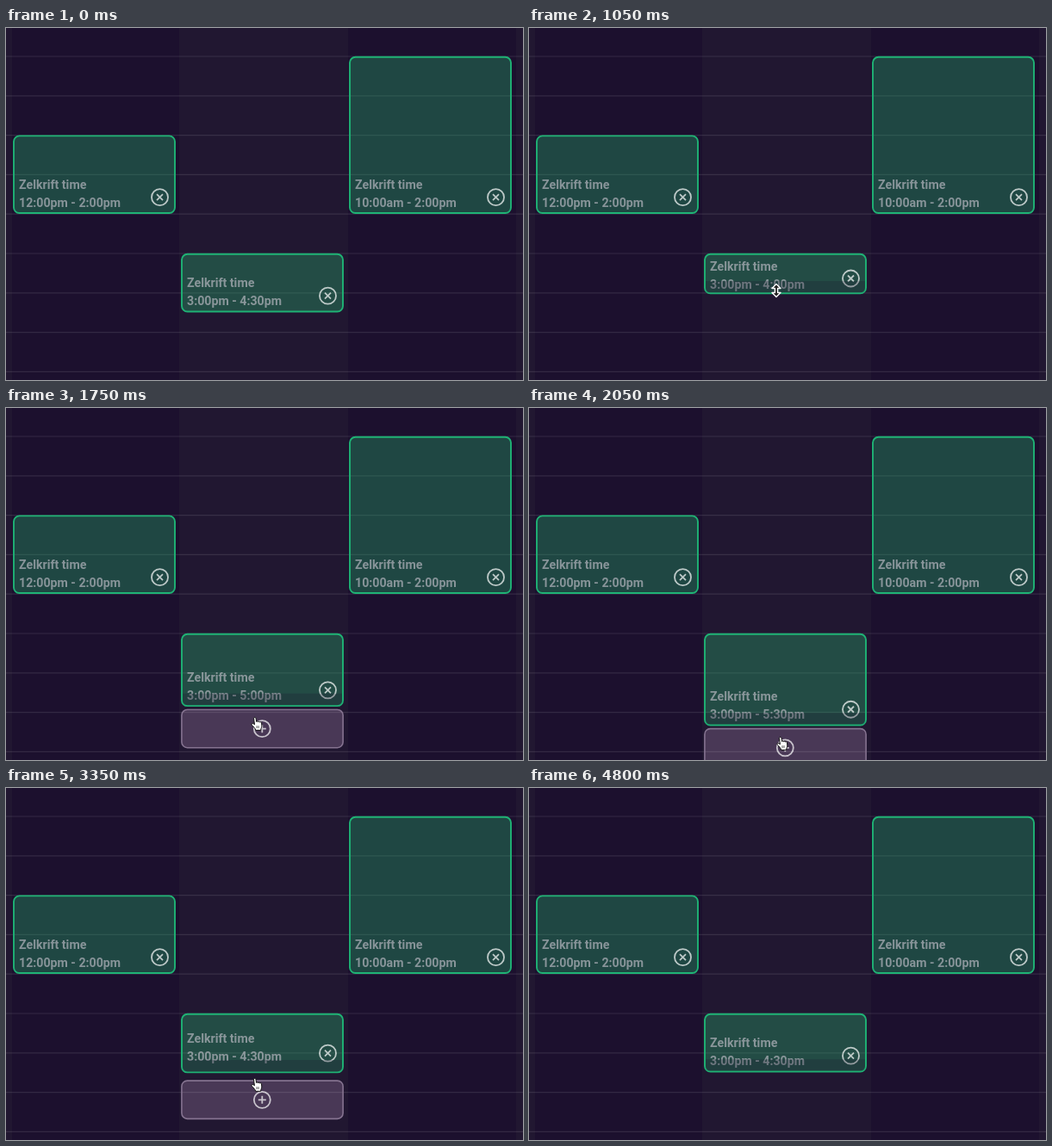
An HTML page for the animation above (4850 ms loop, 600 by 409 pixels).

```html
<!DOCTYPE html>
<html lang="en">
<head>
<meta charset="utf-8">
<title>Calendar slots</title>
<style>
  html, body { margin: 0; width: 100%; height: 100%; overflow: hidden; background: #1c102e; }
  svg { display: block; width: 600px; height: 409px; }
  text { font: 600 14.2px Roboto, sans-serif; fill: rgba(232, 218, 232, .52); }
  .column { fill: #211731; }
  .line { stroke: rgba(255, 255, 255, .1); stroke-width: 1.2; }
  .card { fill: rgba(39, 176, 106, .35); stroke: #1fb375; stroke-width: 1.9; }
  .slot { fill: rgba(255, 206, 255, .18); stroke: #857390; stroke-width: 1.6; }
  .icon { fill: none; stroke: rgba(255, 255, 255, .7); stroke-width: 1.8; }
  .hand { fill: #fff; stroke: #111; stroke-linejoin: round; }
  .arrows { fill: #222; stroke: #fff; stroke-width: 1.4; stroke-linejoin: round; }
</style>
</head>
<body>
<svg id="stage" viewBox="0 0 600 409"></svg>
<script>
const LOOP = 4850, TICK = 50;
const HOUR = 45.8, FIRST = 10, GRID_TOP = 33;
const stage = document.getElementById('stage');

function add(parent, tag, attrs = {}, text = '') {
  const el = document.createElementNS('http://www.w3.org/2000/svg', tag);
  set(el, attrs);
  el.textContent = text;
  parent.append(el);
  return el;
}

function set(el, attrs) {
  for (const key in attrs) el.setAttribute(key, attrs[key]);
}

const move = (el, x, y) => el.setAttribute('transform', `translate(${x} ${y})`);
const show = (el, on) => el.setAttribute('visibility', on ? 'visible' : 'hidden');
const hourY = h => GRID_TOP + (h - FIRST) * HOUR;

function clock(h) {
  return `${Math.floor(h - 1) % 12 + 1}:${h % 1 ? '30' : '00'}${h < 12 ? 'am' : 'pm'}`;
}

// The CSS "ease" curve, cubic-bezier(.25, .1, .25, 1)
function ease(x) {
  if (x <= 0) return 0;
  if (x >= 1) return 1;
  const bez = (u, a, b) => 3 * u * (1 - u) * (1 - u) * a + 3 * u * u * (1 - u) * b + u * u * u;
  let lo = 0, hi = 1;
  for (let i = 0; i < 20; i++) {
    const mid = (lo + hi) / 2;
    if (bez(mid, .25, .25) < x) lo = mid; else hi = mid;
  }
  return bez(lo, .1, 1);
}

// What the pointer is over, and the hour at which the middle card ends
const events = [
  { at: 0, over: '', end: 16.5 },
  { at: 200, over: 'card', end: 16.5 },
  { at: 850, over: 'card', end: 16 },
  { at: 1350, over: 'slot', end: 16.5 },
  { at: 1620, over: 'slot', end: 17 },
  { at: 1925, over: 'slot', end: 17.5 },
  { at: 2668, over: 'card', end: 17.5 },
  { at: 2780, over: 'card', end: 17 },
  { at: 3125, over: 'card', end: 16.5 },
  { at: 3245, over: 'slot', end: 16.5 },
  { at: 3820, over: 'card', end: 16.5 },
  { at: 4480, over: '', end: 16.5 }
];

// Time and position of the pointer
const path = [
  [100, 300, 430], [300, 287, 313], [600, 287, 313], [900, 287, 318], [1050, 287, 305],
  [1350, 287, 335], [1500, 287, 335], [1950, 294, 390], [2450, 294, 390], [2800, 293, 361],
  [3150, 293, 338], [3350, 291, 345], [3650, 291, 345], [3950, 289, 300], [4450, 289, 300],
  [4640, 300, 430]
];

// Transitions toward goal(event) each time it changes
function follow(goal, t, duration = 300) {
  let last = goal(events[0]), value = last;
  for (const e of events) {
    const next = goal(e);
    if (next !== last) value += (next - value) * ease((t - e.at) / duration);
    last = next;
  }
  return value;
}

function pointerAt(t) {
  const i = path.findIndex(p => p[0] > t);
  if (i < 1) return [300, 440];
  const [t0, x0, y0] = path[i - 1], [t1, x1, y1] = path[i];
  const u = (t - t0) / (t1 - t0), k = u * u * (3 - 2 * u);
  return [x0 + (x1 - x0) * k, y0 + (y1 - y0) * k];
}

function addIcon(parent, mark) {
  const g = add(parent, 'g', { class: 'icon' });
  add(g, 'circle', { r: 9.5 });
  add(g, 'path', { d: mark });
  return g;
}

function addCard(x, from) {
  const top = hourY(from);
  const box = add(stage, 'rect', { class: 'card', x: x + 1, y: top + .8, width: 187, rx: 6.5 });
  const title = add(stage, 'text', { x: x + 7 }, 'Zelkrift time');
  const hours = add(stage, 'text', { x: x + 7 });
  const icon = addIcon(stage, 'M-3.5-3.5 3.5 3.5M3.5-3.5-3.5 3.5');
  return (to, bottom = hourY(to), lift = 0) => {
    const rise = Math.min(lift, bottom - top - 49);
    set(box, { height: bottom - top - 2 });
    set(title, { y: bottom - 29.5 - rise });
    set(hours, { y: bottom - 8.5 - rise });
    hours.textContent = `${clock(from)} - ${clock(to)}`;
    move(icon, x + 170.5, bottom - 19.5 - rise * .66);
  };
}

for (const [x, width] of [[0, 7], [201, 196], [592, 8]])
  add(stage, 'rect', { class: 'column', x, width, height: 409 });
for (let h = FIRST; h < FIRST + 9; h++)
  add(stage, 'line', { class: 'line', x2: 600, y1: hourY(h), y2: hourY(h) });

addCard(8, 12)(14);
addCard(398, 10)(14);
const drawCard = addCard(203, 15);
const strip = add(stage, 'path', {
  d: 'M205-15.5H390V-6.5Q390-2 385.5-2H209.5Q205-2 205-6.5Z', fill: 'rgba(30, 24, 46, .26)'
});

const slot = add(stage, 'g');
add(slot, 'rect', { class: 'slot', x: 203.9, y: .8, width: 187.2, height: 44.2, rx: 6.5 });
move(addIcon(slot, 'M-4.5 0H4.5M0-4.5V4.5'), 297.3, 23);

const hand = add(stage, 'g', { class: 'hand' });
add(hand, 'path', {
  d: 'M-3.5-6.3c0-1.8 2.3-1.7 2.5 0l.6 3.8c.3-.9 1.9-.8 2 .2 .4-.8 1.9-.6 2 .4 .4-.6 1.8-.4 1.9.6' +
     'l.3 3.4c0 1.7-1 2.6-1.2 5.2H-1.3C-1.8 5-4.2 3-5.6 1.4c-1.1-1.4.4-2.6 1.7-1.6l1.3 1z'
});
add(hand, 'path', { d: 'M0 2.2V5M2 2.2V5', 'stroke-width': .7 });
const arrows = add(stage, 'path', {
  class: 'arrows', d: 'M0-7.5 5-2.5H1.6V2.5H5L0 7.5-5 2.5H-1.6V-2.5H-5Z'
});

function draw(t) {
  const now = events.findLast(e => e.at <= t);
  const endY = e => hourY(e.end);
  const bottom = follow(endY, t);

  drawCard(now.end, bottom, follow(e => e.over === 'card' ? 15 : 0, t));
  move(strip, 0, bottom);
  set(strip, { opacity: ease((t - events[1].at) / 200) });

  move(slot, 0, follow(endY, t - 35) + 6.5);
  set(slot, { opacity: follow(e => e.over === 'slot' ? 1 : 0, t, 100) });

  const [x, y] = pointerAt(t);
  const resizing = now.over === 'card' && y > endY(now) - 16;
  move(hand, x, y);
  move(arrows, x, y);
  show(hand, !resizing);
  show(arrows, resizing);
}

const start = performance.now();
function frame() {
  const t = (performance.now() - start) % LOOP;
  draw(Math.floor(t / TICK) * TICK);
  requestAnimationFrame(frame);
}
frame();
</script>
</body>
</html>
```
